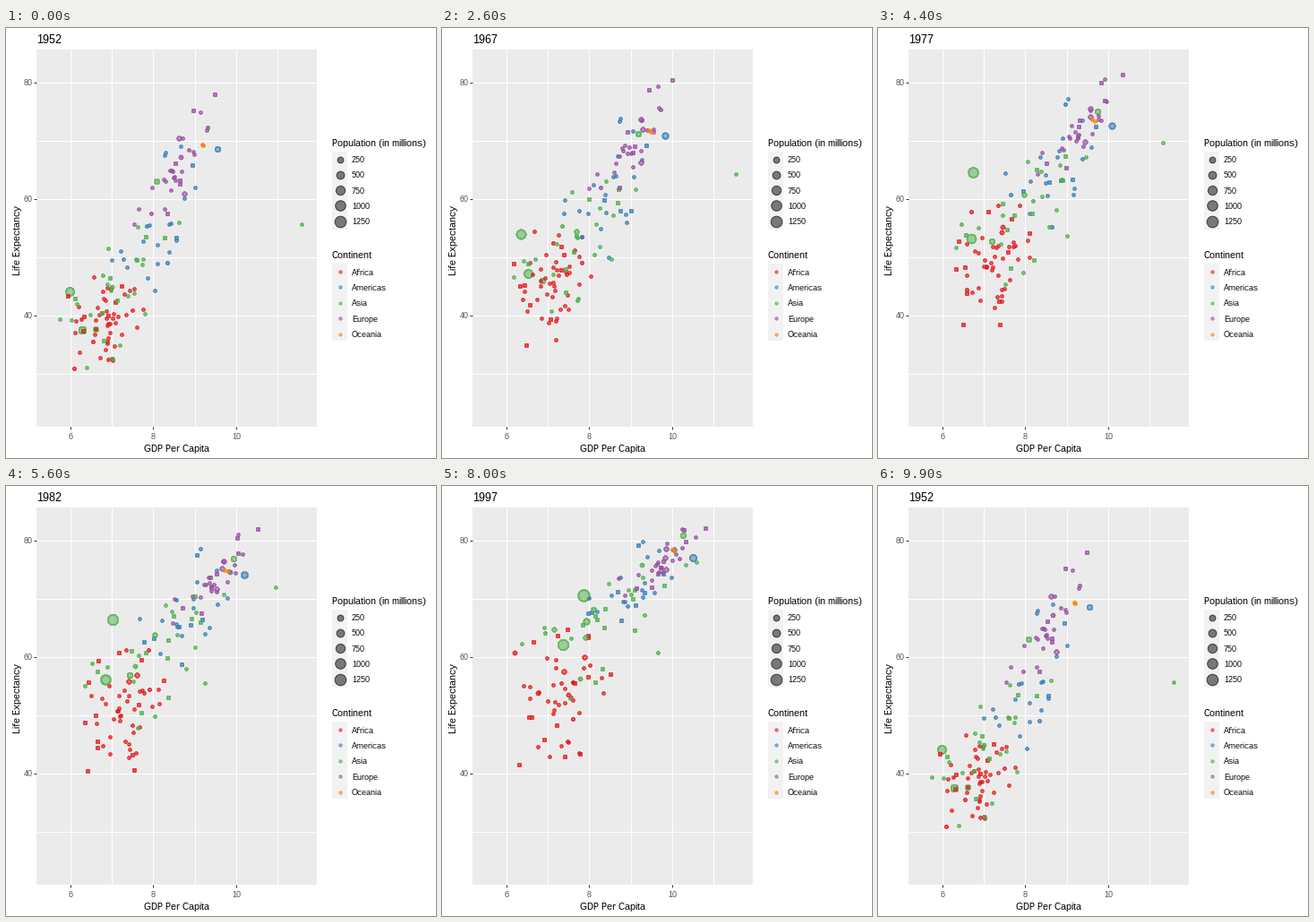
A matplotlib script that plays this animation: 480x480 px, repeating every 10 s.

```python
import matplotlib.pyplot as plt
import numpy as np
from matplotlib.animation import FuncAnimation
from matplotlib.colors import to_rgba
from matplotlib.patches import Rectangle

plt.rcParams.update({"font.family": "Liberation Sans",
                     "text.hinting": "native", "text.hinting_factor": 1})

PX = 0.75  # points per pixel at 96 dpi
FRAMES = 100
YEARS = np.arange(1952, 2008, 5)
U = np.linspace(0, 1, len(YEARS))
HOLD = [5] * 5 + [4] * 7            # resting frames before each move
MOVE = [4] * 5 + [3] + [4] * 6      # frames of each move
COLORS = {"Africa": "#E41A1C", "Americas": "#377EB8", "Asia": "#4DAF4A",
          "Europe": "#984EA3", "Oceania": "#FF7F00"}

# Clouds: x and y are (start, end, bulge halfway), sx and sy spreads (start, end),
# rho ties y to x, pop is (median millions, growth over the whole time).
CLOUDS = {
    "Africa": dict(n=52, x=(6.85, 7.35, .15), sx=(.6, .85), y=(39, 54.5, 3),
                   sy=(5, 8.5), rho=.55, pop=(5, 3.5)),
    "Americas": dict(n=24, x=(8.05, 9, .12), sx=(.5, .55), y=(53.5, 73.3, 1.5),
                     sy=(9, 4), rho=.75, pop=(6, 2.6)),
    "Asia": dict(n=28, x=(7.3, 8.8, .2), sx=(.85, 1.1), y=(47, 70.5, 2.5),
                 sy=(8.5, 6.5), rho=.7, pop=(9, 2.6)),
    "Europe": dict(n=30, x=(8.6, 9.95, .15), sx=(.5, .5), y=(65, 77.6, 1.6),
                   sy=(5, 2.7), rho=.8, pop=(8, 1.25)),
    "Oceania": dict(n=2, x=(9.23, 10.3, 0), sx=(.03, .15), y=(69.3, 80.7, -1),
                    sy=(.2, .5), rho=.8, pop=(7, 2)),
}

# Countries that stand out: population at both ends, x and y in the key years.
KEYS = [1952, 1962, 1972, 1992, 2007]
GIANTS = [
    ("Asia", (556, 1319), (5.99, 6.19, 6.52, 7.41, 8.51), (44, 44.5, 63.1, 68.7, 73)),
    ("Asia", (372, 1110), (6.30, 6.49, 6.59, 7.06, 7.81), (37.4, 43.6, 50.7, 60.2, 64.7)),
    ("Asia", (82, 224), (6.62, 6.74, 7.01, 7.77, 8.17), (37.5, 42.5, 49.2, 62.7, 70.6)),
    ("Asia", (86, 127), (8.08, 8.79, 9.60, 10.20, 10.36), (63, 68.7, 73.4, 79.4, 82.6)),
    ("Asia", (.2, 2.5), (11.59, 11.47, 11.61, 10.46, 10.76), (55.6, 60.5, 67.7, 75.2, 77.6)),
    ("Americas", (158, 301), (9.55, 9.69, 9.99, 10.37, 10.67), (68.4, 70.2, 71.3, 76.1, 78.2)),
]


def radius(pop):
    """Marker radius in pixels for a population in millions."""
    size = 1 + 5 * np.sqrt(np.clip(pop / 1319, 0, 1))
    return 0.375 * (2.845 * size + 0.945) - 0.3


def area(r):
    return (2 * r * PX) ** 2


def to_x(v):
    return 71.7 + 46.35 * (v - 6)


def to_y(v):
    return 60.5 + 6.5 * (80 - v)


def mix(a, b, t):
    return a + (b - a) * t


def arc(start, end, bulge):
    return mix(start, end, U) + bulge * np.sin(np.pi * U)


def country(rng, x, sx, y, sy, rho, pop):
    """Path of one country: a fixed place in its cloud plus a slow drift."""
    a, b, c = np.clip(rng.normal(size=3), -2, 2)
    drift = 0.2 * np.sin(2 * np.pi * (U[:, None] * rng.uniform(.5, 1.2, 2) + rng.random(2)))
    px = a + drift[:, 0]
    py = rho * a + np.sqrt(1 - rho ** 2) * b + drift[:, 1]
    median, growth = pop
    people = median * np.exp(1.1 * c) * growth ** (U - 0.5)
    return (np.clip(arc(*x) + mix(*sx, U) * px, 5.7, 10.8),
            np.clip(arc(*y) + mix(*sy, U) * py, 28.8, 82), people)


def build():
    """Pixel x, y and radius of every country in every year."""
    rng = np.random.default_rng(7)
    rows, colors = [], []
    for cont, pop, xs, ys in GIANTS:
        rows.append((np.interp(YEARS, KEYS, xs), np.interp(YEARS, KEYS, ys), mix(*pop, U)))
        colors.append(COLORS[cont])
    for cont, spec in CLOUDS.items():
        shape = {k: v for k, v in spec.items() if k != "n"}
        for _ in range(spec["n"]):
            rows.append(country(rng, **shape))
            colors.append(COLORS[cont])
    x, y, pop = np.array(rows).swapaxes(0, 1)
    return np.stack([to_x(x), to_y(y), radius(pop)]), colors


DATA, POINT_COLORS = build()

fig = plt.figure(figsize=(5, 5), dpi=96, facecolor="white")
ax = fig.add_axes([0, 0, 1, 1])
ax.set(xlim=(0, 480), ylim=(480, 0))
ax.axis("off")


def box(x0, y0, x1, y1, color):
    ax.add_patch(Rectangle((x0, y0), x1 - x0, y1 - y0, fc=color, ec="none", lw=0, zorder=0))


def line(xs, ys, color):
    ax.plot(xs, ys, color=color, lw=PX, solid_capstyle="butt", zorder=1)


def text(x, y, s, size, color="black", **kw):
    return ax.text(x, y, s, fontsize=size * PX, color=color, va="baseline", **kw)


def dots(x, y, r, colors):
    return ax.scatter(x, y, s=area(r), linewidths=PX, antialiased=False, zorder=3,
                      facecolors=[to_rgba(c, 0.5) for c in colors],
                      edgecolors=[to_rgba(c, 0.65) for c in colors])


# Panel, grid and axes
box(34, 24, 347, 445, "#EBEBEB")
for v in range(6, 12):
    line([to_x(v)] * 2, [24, 445], "white")
for v in range(30, 81, 10):
    line([34, 347], [to_y(v) + 0.5] * 2, "white")
for v in (6, 8, 10):
    line([to_x(v)] * 2, [445, 448], "#333333")
    text(to_x(v), 459, str(v), 9, "#4D4D4D", ha="center")
for v in (40, 60, 80):
    line([31, 34], [to_y(v) + 0.5] * 2, "#333333")
    text(29.5, to_y(v) + 3.5, str(v), 9, "#4D4D4D", ha="right")
text(190.5, 473, "GDP Per Capita", 11, ha="center")
text(15.5, 237.5, "Life Expectancy", 11, ha="center", rotation=90, rotation_mode="anchor")
title = text(34, 17, "1952", 13)

# Legends
text(364, 132, "Population (in millions)", 11)
box(364, 138, 381, 225, "#F2F2F2")
for i, pop in enumerate(range(250, 1251, 250)):
    y = 146.5 + 17.28 * i
    dots([372.5], [y], radius(pop), ["black"])
    text(386, y + 3.5, str(pop), 9)
text(364, 257, "Continent", 11)
box(364, 263, 381, 349, "#F2F2F2")
for i, (name, color) in enumerate(COLORS.items()):
    y = 272 + 17.4 * i
    dots([372.5], [y], 1.65, [color])
    text(386, y + 3.5, name, 9)

points = dots(*DATA[:, :, 0], POINT_COLORS)


def phase(k):
    """Index of the current year and progress towards the next one."""
    start = 0
    for i, (rest, n) in enumerate(zip(HOLD, MOVE)):
        start += rest
        if k < start + n:
            return i, max(0, k - start + 1) / n
        start += n
    return 0, 0


def update(k):
    i, t = phase(k)
    j = (i + 1) % len(YEARS)
    x, y, r = mix(DATA[:, :, i], DATA[:, :, j], t)
    points.set_offsets(np.floor(np.column_stack([x, y])) + 0.5)
    points.set_sizes(area(r))
    title.set_text(str(YEARS[j if t >= 0.5 else i]))
    return points, title


anim = FuncAnimation(fig, update, frames=FRAMES, interval=100,
                     init_func=lambda: update(0), repeat=True, repeat_delay=0, blit=False)
plt.show()
```
